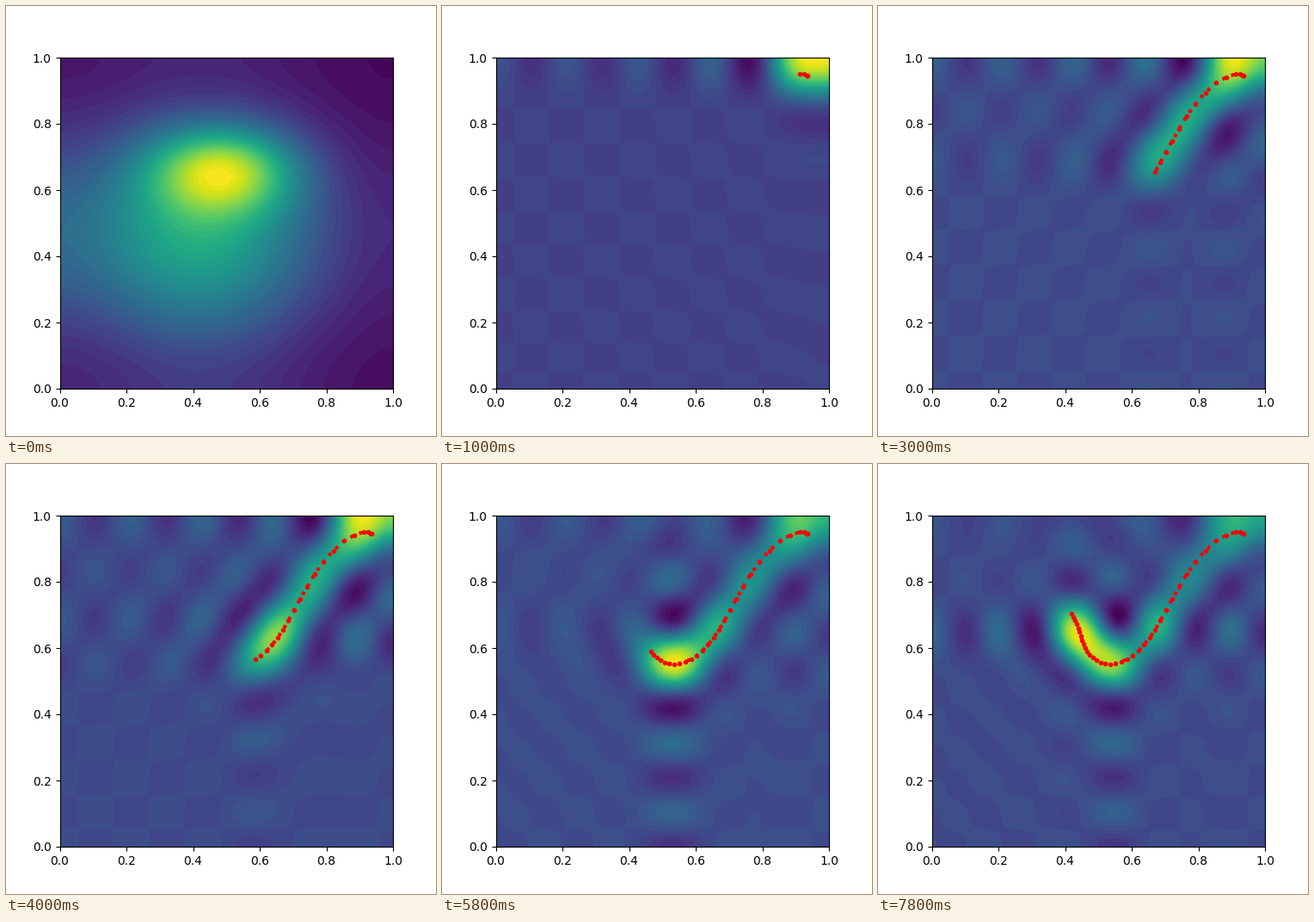
A matplotlib script for the animation above (8 s loop, 500 by 500 pixels).

```python
import numpy as np
import matplotlib.pyplot as plt
from matplotlib.animation import FuncAnimation

FRAMES = 40
N_FREQ = 10
GRID = np.linspace(0, 1, 100)
FREQ = np.arange(N_FREQ)
WEIGHT = np.where(FREQ == 0, 1.0, 2.0)

# Path knots: step, x, y
KNOTS = np.array([
    (1, 0.9355, 0.9455), (3, 0.933, 0.946), (5, 0.912, 0.9505),
    (7, 0.853, 0.9235), (9, 0.791, 0.860), (12, 0.7215, 0.748),
    (15, 0.6697, 0.6545), (18, 0.6206, 0.592), (21, 0.569, 0.5585),
    (24, 0.520, 0.5525), (27, 0.4826, 0.5714), (30, 0.460, 0.6008),
    (33, 0.4472, 0.6364), (36, 0.435, 0.6727), (39, 0.4194, 0.7047),
])


def hermite(t, knots, values):
    """Smooth cubic curve through the knots, evaluated at t."""
    slope = np.gradient(values, knots)
    i = np.clip(np.searchsorted(knots, t, side="right") - 1, 0, len(knots) - 2)
    h = knots[i + 1] - knots[i]
    s = (t - knots[i]) / h
    return ((1 + 2 * s) * (1 - s) ** 2 * values[i]
            + s * (1 - s) ** 2 * h * slope[i]
            + s ** 2 * (3 - 2 * s) * values[i + 1]
            + s ** 2 * (s - 1) * h * slope[i + 1])


def mirrored_bell(centre, sigma):
    """Gaussian on [0, 1], reflected at both ends."""
    images = (centre, -centre, 2 - centre)
    return sum(np.exp(-(GRID - c) ** 2 / (2 * sigma ** 2)) for c in images)


def target_density():
    broad = np.outer(mirrored_bell(0.47, 0.24), mirrored_bell(0.42, 0.27))
    narrow = np.outer(mirrored_bell(0.66, 0.09), mirrored_bell(0.49, 0.15))
    z = 0.6 * broad + 0.56 * narrow
    return z * 3.355 / z.max()


def cosines(x):
    return np.cos(np.pi * np.outer(FREQ, x))


BASIS = WEIGHT[:, None] * cosines(GRID)


def coverage(x, y):
    """Truncated cosine series of the time-averaged path."""
    coef = cosines(y) @ cosines(x).T / len(x)
    return BASIS.T @ coef @ BASIS


steps = np.arange(1, FRAMES)
path_x = hermite(steps, KNOTS[:, 0], KNOTS[:, 1])
path_y = hermite(steps, KNOTS[:, 0], KNOTS[:, 2])

fig, ax = plt.subplots(figsize=(5, 5), dpi=100)


def draw(n):
    ax.clear()
    x, y = path_x[:n], path_y[:n]
    z = coverage(x, y) if n else target_density()
    ax.contourf(GRID, GRID, z, levels=50, cmap="viridis")
    if n:
        ax.plot(x, y, "r.:", linewidth=3)
    ax.set_xlim(0, 1)
    ax.set_ylim(0, 1)
    return []


anim = FuncAnimation(fig, draw, frames=FRAMES, init_func=lambda: draw(0),
                     interval=200, repeat=True, repeat_delay=0, blit=False)
plt.show()
```
